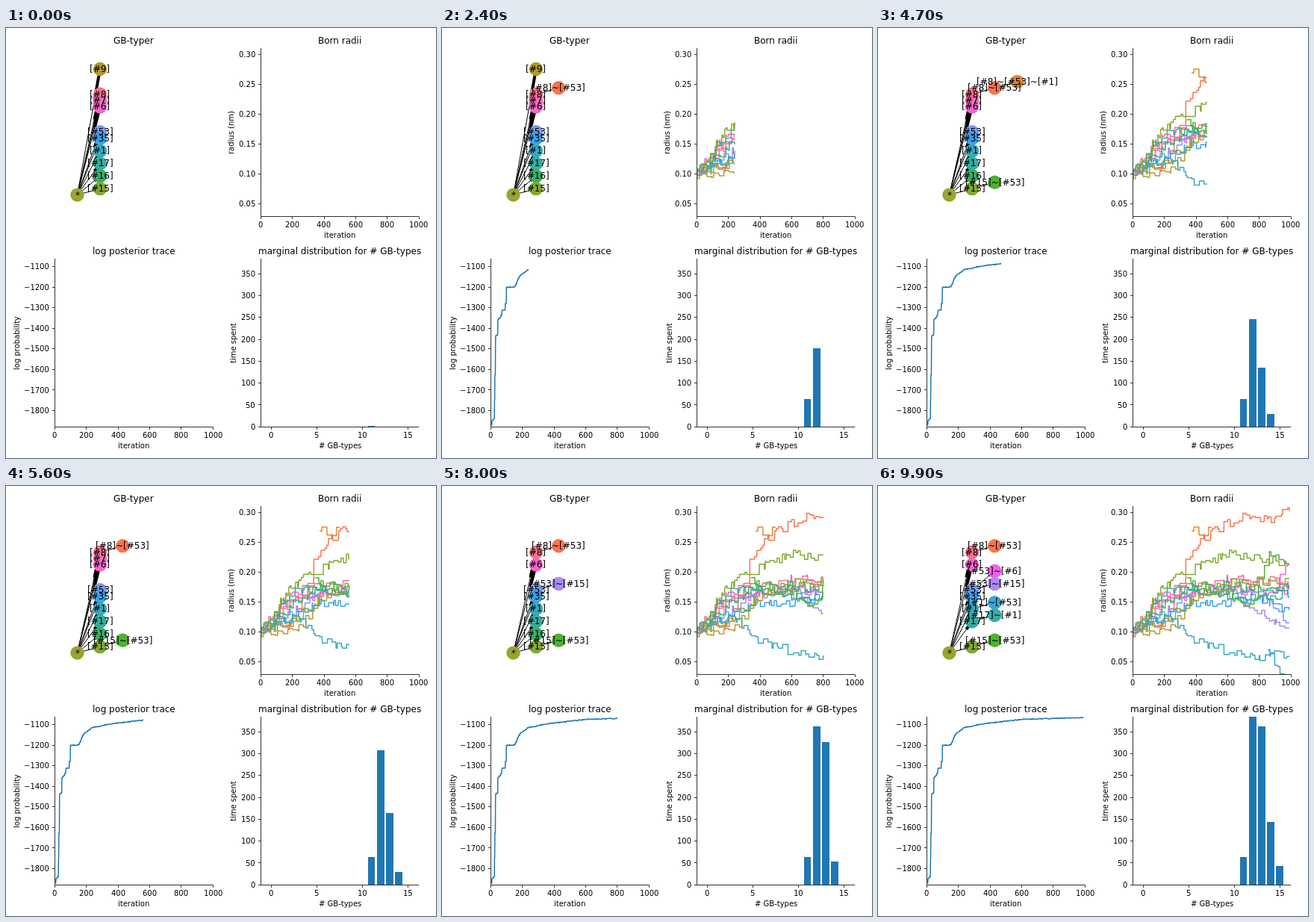
An HTML page with a canvas that plays this animation: 576 by 576 pixels, repeating every 10000 ms.

```html
<!DOCTYPE html>
<html lang="en">
<head>
<meta charset="utf-8">
<title>GB-typer</title>
<style>
  html, body { margin: 0; width: 100%; height: 100%; overflow: hidden; background: #fff; }
  canvas { display: block; width: 576px; height: 576px; }
</style>
</head>
<body>
<canvas id="stage" width="576" height="576"></canvas>
<script>
const ctx = document.getElementById('stage').getContext('2d');
const FONT = '"DejaVu Sans", sans-serif';
const BLUE = '#1f77b4', SPINE = '#333';
const STEP = 100, FRAMES = 100, LAST = 1000;

// Colour wheel, running up the tree from [#8]
const WHEEL = ('f77189 f7754f dd8a32 c79232 b29b32 9ba331 82a931 50b131 33b069 34ae86 35ad9c ' +
  '36acac 38a9bd 39a7cf 3ba3eb 7f97f4 ab89f4 d276f4 f45eec f566c9 f66bac').split(' ');

let seed = 11;
const random = () => (seed = (seed * 16807) % 2147483647) / 2147483647;
const range = (first, step, count) => Array.from({ length: count }, (_, i) => first + i * step);

function lerpAt(points, n) {
  let k = 0;
  while (k < points.length - 2 && points[k + 1][0] <= n) k++;
  const [a, va] = points[k], [b, vb] = points[k + 1];
  return va + (vb - va) * Math.min(1, (n - a) / (b - a));
}

// Staircase along the key points: each level is held for a random while
function walk(points, from, to, hold, jitter) {
  const out = [];
  let value = points[0][1], next = from + 1;
  for (let n = from; n < to; n++) {
    if (n >= next) {
      value = lerpAt(points, n) + (random() - 0.5) * jitter;
      next = n + 1 + Math.floor(random() * hold);
    }
    out.push(value);
  }
  return out;
}

// Tree from top to bottom: name, radii (thousandths of a nm) spread evenly over its life, and that life
const types = [
  ['[#9]', [100, 100, 112, 158], 0, 389],
  ['[#8]~[#7]', [170, 163], 308, 360],
  ['[#8]~[#53]~[#1]', [270, 264, 270, 266], 375, 500],
  ['[#8]~[#53]', [105, 112, 212, 262, 282, 294, 288, 307], 63],
  ['[#8]', [100, 155, 162, 170, 188, 178]],
  ['[#7]', [100, 160, 178, 181, 190, 190], 0, 797],
  ['[#6]', [100, 150, 164, 174, 165, 171]],
  ['[#53]~[#6]', [168, 205, 214], 905],
  ['[#16]~[#53]', [166, 163], 735, 758],
  ['[#53]~[#15]', [162, 142, 120, 108], 612],
  ['[#53]', [100, 132, 168, 165, 163, 111]],
  ['[#35]', [100, 125, 150, 148, 158, 135]],
  ['[#1]~[#53]', [68, 43, 29, 29], 859],
  ['[#1]', [100, 128, 86, 66, 57, 65]],
  ['[#17]~[#1]', [159, 172, 178], 823],
  ['[#17]', [100, 170, 172, 160, 158, 162]],
  ['[#8]~[#6]', [172, 172], 0, 0],
  ['[#16]', [100, 145, 172, 180, 172, 176], 0, 947],
  ['[#15]~[#53]', [190, 173, 165, 140, 230, 215], 345],
  ['[#15]', [100, 178, 208, 231, 222, 217]],
  ['*', [100, 117, 160, 182, 184, 183]]
].map(([name, radii, from = 0, to = LAST], slot) => {
  const gap = (to - from) / (radii.length - 1);
  const points = radii.map((r, i) => [from + i * gap, r / 1000]);
  const depth = name.split('~').length - 1;
  return {
    name, from, to,
    x: name === '*' ? 95.5 : 126 + 30.3 * depth,
    y: 55 + 8.43 * slot,
    color: '#' + WHEEL[(25 - slot) % WHEEL.length],
    parent: depth ? name.slice(0, name.lastIndexOf('~')) : '*',
    radii: walk(points, from, to, 38, 0.016)
  };
});

const logKeys = [[0, -1878], [2, -1856], [23, -1836], [25, -1664], [31, -1436], [42, -1429], [43, -1362],
  [66, -1335], [72, -1311], [90, -1311], [97, -1202], [150, -1198], [182, -1145], [236, -1115],
  [350, -1097], [600, -1075], [1000, -1066]];
const logTrace = walk(logKeys, 0, LAST, 8, 4);

const alive = (node, n) => node.from <= n && n < node.to;

// Text starts on whole pixels
function label(text, x, y, size = 10, share = 0.5) {
  ctx.font = `${size}px ${FONT}`;
  ctx.fillStyle = '#000';
  ctx.fillText(text, Math.round(x - ctx.measureText(text).width * share), Math.round(y));
}

function line(x1, y1, x2, y2, width = 1, color = '#000') {
  ctx.lineWidth = width;
  ctx.strokeStyle = color;
  ctx.beginPath();
  ctx.moveTo(x1, y1);
  ctx.lineTo(x2, y2);
  ctx.stroke();
}

const snap = v => Math.floor(v) + 0.5;
const iterations = { xName: 'iteration', xTicks: range(0, 200, 6) };

const radiiAxes = {
  ...iterations, left: 341.2, top: 27, bottom: 252.2, title: 'Born radii',
  yName: 'radius (nm)', yNameX: 305, yTicks: range(0.05, 0.05, 6), digits: 2,
  x: n => 341.2 + n * 0.212, y: r => 275.4 - r * 800
};
const traceAxes = {
  ...iterations, left: 65.3, top: 309, bottom: 534.2, title: 'log posterior trace',
  yName: 'log probability', yNameX: 18, yTicks: range(-1800, 100, 8), digits: 0,
  x: n => 65.3 + n * 0.212, y: v => 319.5 + (-1100 - v) * 0.2757
};
const barAxes = {
  left: 341.2, top: 309, bottom: 534.2, title: 'marginal distribution for # GB-types',
  xName: '# GB-types', xTicks: range(0, 5, 4),
  yName: 'time spent', yNameX: 308, yTicks: range(0, 50, 8), digits: 0,
  x: c => 355.5 + c * 12.18, y: h => 534.2 - h * 0.586
};

function drawAxes(a) {
  const left = snap(a.left), bottom = snap(a.bottom);
  line(left, a.top, left, bottom + 0.5, 1, SPINE);
  line(left - 0.5, bottom, a.left + 212, bottom, 1, SPINE);
  for (const t of a.xTicks) {
    const x = snap(a.x(t));
    line(x, bottom, x, bottom + 3.5, 1, SPINE);
    label(String(t), a.x(t), a.bottom + 14.6);
  }
  for (const t of a.yTicks) {
    const y = snap(a.y(t));
    line(left - 3.5, y, left, y, 1, SPINE);
    label(t.toFixed(a.digits).replace('-', '\u2212'), a.left - 7, a.y(t) + 3.7, 10, 1);
  }
  label(a.title, a.left + 106, a.top - 6, 12);
  label(a.xName, a.left + 106, a.bottom + 28.6);
  ctx.save();
  ctx.translate(a.yNameX, Math.round((a.top + a.bottom) / 2));
  ctx.rotate(-Math.PI / 2);
  label(a.yName, 0, 0);
  ctx.restore();
}

function inside(a, draw) {
  ctx.save();
  ctx.beginPath();
  ctx.rect(a.left, a.top, 212, a.bottom - a.top);
  ctx.clip();
  draw();
  ctx.restore();
}

function curve(a, values, from, now, color) {
  ctx.beginPath();
  values.slice(0, now - from + 1).forEach((v, i) => ctx.lineTo(a.x(from + i), a.y(v)));
  ctx.lineWidth = 1.5;
  ctx.lineJoin = 'round';
  ctx.strokeStyle = color;
  ctx.stroke();
}

function drawTree(now) {
  const nodes = types.filter(t => alive(t, now));
  for (const b of nodes) {
    const a = nodes.find(t => t.name === b.parent);
    if (!a || a === b) continue;
    line(a.x, a.y, b.x, b.y);
    line(b.x - (b.x - a.x) / 4, b.y - (b.y - a.y) / 4, b.x, b.y, 4);
  }
  for (const t of nodes) {
    ctx.fillStyle = t.color;
    ctx.beginPath();
    ctx.arc(t.x, t.y, 9.2, 0, 2 * Math.PI);
    ctx.fill();
  }
  for (const t of nodes) label(t.name, t.x, t.y + 3.9, 12);
  label('GB-typer', 171.3, 21, 12);
}

function drawBars(now) {
  const spent = {};
  for (let n = 0; n <= now; n++) {
    const count = types.filter(t => alive(t, n)).length;
    spent[count] = (spent[count] || 0) + 1;
  }
  ctx.fillStyle = BLUE;
  for (const c in spent) {
    const left = Math.round(barAxes.x(+c - 0.4)), right = Math.round(barAxes.x(+c + 0.4));
    const top = Math.floor(barAxes.y(spent[c]));
    ctx.fillRect(left, top, right - left, barAxes.bottom - top);
  }
}

function draw(now) {
  ctx.fillStyle = '#fff';
  ctx.fillRect(0, 0, 576, 576);
  drawTree(now);
  inside(radiiAxes, () => {
    for (const t of types) if (t.from <= now) curve(radiiAxes, t.radii, t.from, now, t.color);
  });
  inside(traceAxes, () => curve(traceAxes, logTrace, 0, now, BLUE));
  inside(barAxes, () => drawBars(now));
  [radiiAxes, traceAxes, barAxes].forEach(drawAxes);
}

const start = performance.now();
let shown = -1;
function tick() {
  const frame = Math.floor((performance.now() - start) / STEP) % FRAMES;
  if (frame !== shown) draw((shown = frame) * 10);
  requestAnimationFrame(tick);
}
tick();
</script>
</body>
</html>
```
